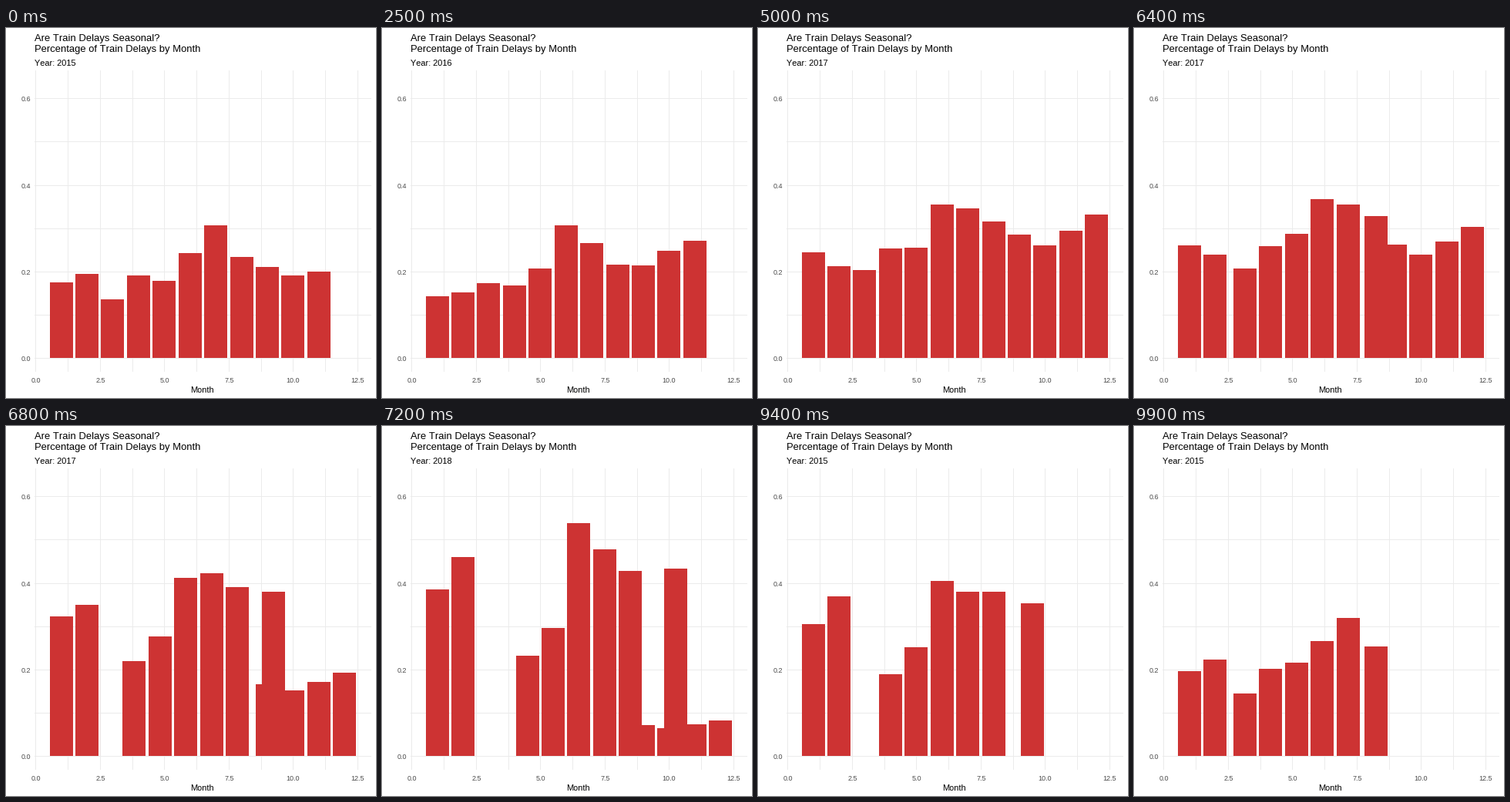
These frames come from a looping animation (480 by 480 pixels, 10 s). A matplotlib script:

```python
import matplotlib.pyplot as plt
from matplotlib.animation import FuncAnimation
from matplotlib.patches import Rectangle

SIZE, DPI = 480, 100
FRAMES, INTERVAL = 100, 100
X0, X_UNIT = 38.2, 33.42      # pixel of month 0, pixels per month
Y0, Y_UNIT = 428.3, 562.0     # pixel of zero, pixels per 1.0
BAR_WIDTH = 0.9
BAR, GRID = "#CD3333", "#EBEBEB"

plt.rcParams["font.family"] = "Liberation Sans"
plt.rcParams["text.kerning_factor"] = 6

# Share of delayed trains per month: (year, months, values)
STATES = [
    (2015, range(1, 12),
     [.175, .194, .136, .191, .178, .242, .306, .234, .210, .191, .200]),
    (2016, range(1, 12),
     [.143, .152, .173, .168, .207, .306, .265, .216, .214, .248, .271]),
    (2017, range(1, 13),
     [.244, .212, .203, .253, .255, .354, .346, .315, .285, .260, .294, .331]),
    (2018, (1, 2, 5, 6, 7, 8, 9, 11),
     [.433, .542, .2425, .311, .6325, .518, .454, .472]),
]
# Last still frame of each state, and the frame where the next one is reached
SPANS = [(12, 25), (38, 50), (63, 75), (88, 100)]


def px(month):
    return round(X0 + month * X_UNIT)


def py(value):
    return round(Y0 - value * Y_UNIT)


def mix(a, b, t):
    return a + (b - a) * t


def pose(frame):
    """Return the year shown and a list of (month, value) bars."""
    i = next(n for n, (_, end) in enumerate(SPANS) if frame < end)
    start, end = SPANS[i]
    t = max(0, frame - start) / (end - start)
    year, months, values = STATES[i]
    next_year, next_months, next_values = STATES[(i + 1) % len(STATES)]
    bars = []
    for row, (month, value) in enumerate(zip(months, values)):
        if row < len(next_values):
            bars.append((mix(month, next_months[row], t),
                         mix(value, next_values[row], t)))
        else:
            bars.append((month, value * (1 - t)))  # leaving bars shrink
    return (next_year if t >= 0.5 else year), bars


fig = plt.figure(figsize=(SIZE / DPI, SIZE / DPI), dpi=DPI, facecolor="white")
ax = fig.add_axes([0, 0, 1, 1])
ax.set_xlim(0, SIZE)
ax.set_ylim(SIZE, 0)
ax.axis("off")


def box(x, y, w, h, color, z):
    return ax.add_patch(Rectangle((x, y), w, h, facecolor=color, linewidth=0,
                                  antialiased=False, zorder=z))


def label(x, y, text, size, color="black", ha="left"):
    return ax.text(x, y, text, fontsize=size * 72 / DPI, color=color,
                   ha=ha, va="baseline", zorder=3)


for n in range(11):
    x = px(n * 1.25)
    box(x, 55, 1, 391, GRID, 1)
    if n % 2 == 0:
        label(x + 0.5, 460, f"{n * 1.25:.1f}", 9, "#4D4D4D", "center")
for n in range(7):
    y = py(n / 10)
    box(37, y, 437, 1, GRID, 1)
    if n % 2 == 0:
        label(32, y + 4, f"{n / 10:.1f}", 9, "#4D4D4D", "right")

label(37, 17, "Are Train Delays Seasonal?", 13)
label(37, 31, "Percentage of Train Delays by Month", 13)
label(254.5, 473, "Month", 11, ha="center")
subtitle = label(37, 49, "", 11)
rects = [box(0, 0, 0, 0, BAR, 2) for _ in range(12)]


def draw(frame):
    year, bars = pose(frame)
    subtitle.set_text(f"Year: {year}")
    for rect in rects[len(bars):]:
        rect.set_visible(False)
    for rect, (month, value) in zip(rects, bars):
        left, right = px(month - BAR_WIDTH / 2), px(month + BAR_WIDTH / 2)
        top = py(value)
        rect.set_bounds(left, top, right - left, py(0) - top)
        rect.set_visible(True)
    return [subtitle, *rects]


anim = FuncAnimation(fig, draw, frames=FRAMES, interval=INTERVAL,
                     repeat=True, repeat_delay=0, blit=False)
plt.show()
```
